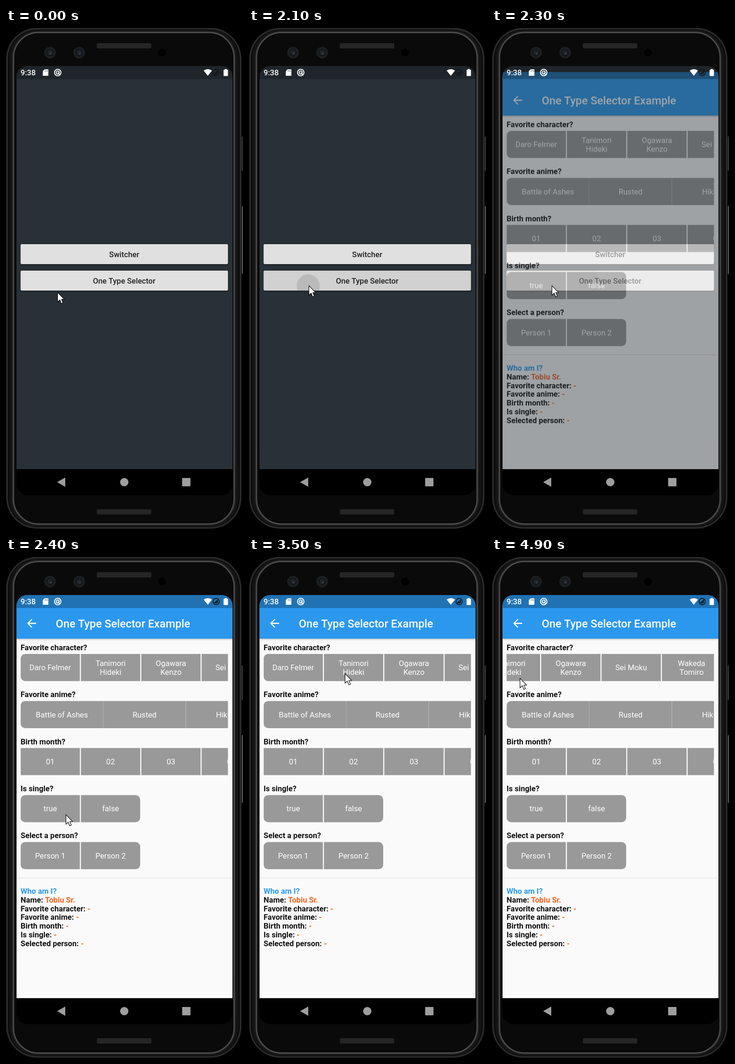
An HTML page with a canvas for the animation above (5 s loop, 512 px wide and 1080 px high).

```html
<!DOCTYPE html>
<html lang="en">
<head>
<meta charset="utf-8">
<title>One Type Selector</title>
<style>
html, body { margin: 0; width: 100%; height: 100%; overflow: hidden; background: #000; }
canvas { display: block; width: 512px; height: 1080px; }
</style>
</head>
<body>
<canvas id="stage" width="512" height="1080"></canvas>
<script>
const W = 512, H = 1080, LOOP = 5000, STEP = 100;
const SCREEN = { x: 22.5, y: 82, w: 467, h: 869 };
const DP = 467 / 392.73;
const ROW_TOP = 209, ROW_PITCH = 101.4, CELL_H = 58.5;
const LEFT = 31.5, RIGHT = 479.5;
const BLUE = '#2b98ee', ORANGE = '#f1641f', GREY = '#999';

const stage = document.getElementById('stage').getContext('2d');
const makeLayer = () => {
  const c = document.createElement('canvas');
  c.width = W;
  c.height = H;
  return c.getContext('2d');
};
const page = makeLayer();
const phone = makeLayer();

const clamp = v => Math.max(0, Math.min(1, v));

function bezier(x1, y1, x2, y2) {
  const at = (a, b, u) => 3 * a * u * (1 - u) ** 2 + 3 * b * u * u * (1 - u) + u ** 3;
  return x => {
    let lo = 0, hi = 1;
    for (let i = 0; i < 24; i++) {
      const mid = (lo + hi) / 2;
      if (at(x1, x2, mid) < x) lo = mid; else hi = mid;
    }
    return at(y1, y2, lo);
  };
}
const fastOutSlowIn = bezier(0.4, 0, 0.2, 1);
const easeIn = bezier(0.42, 0, 1, 1);
const smooth = u => u * u * (3 - 2 * u);

// Interpolates keys of [time, ...values], easing within each span.
function track(keys, t, ease = smooth) {
  let i = 0;
  while (i < keys.length - 2 && t >= keys[i + 1][0]) i++;
  const [a, b] = [keys[i], keys[i + 1]];
  const u = ease(clamp((t - a[0]) / (b[0] - a[0])));
  return a.slice(1).map((v, k) => v + (b[k + 1] - v) * u);
}

const POINTER = [[0, 111, 569.5], [1800, 129, 555], [2500, 129, 555], [3400, 207, 251], [3600, 207, 251], [4200, 138, 246], [4900, 60, 261]];
const SCROLL = [[3600, 0], [4200, 148.5], [4900, 186]];

function box(g, x, y, w, h, r, fill) {
  g.beginPath();
  g.roundRect(x, y, w, h, r);
  g.fillStyle = fill;
  g.fill();
}

function disc(g, x, y, r, fill) {
  g.beginPath();
  g.arc(x, y, r, 0, 7);
  g.fillStyle = fill;
  g.fill();
}

function poly(g, points, fill) {
  g.beginPath();
  points.forEach(([x, y]) => g.lineTo(x, y));
  g.closePath();
  g.fillStyle = fill;
  g.fill();
}

function text(g, str, x, y, { sp = 14, weight = 400, color = '#fff', align = 'left' } = {}) {
  g.font = `${weight} ${sp * DP}px Roboto, "Open Sans", sans-serif`;
  g.textAlign = align;
  g.fillStyle = color;
  g.fillText(str, x, y);
}

function drawSpeaker(g, y) {
  box(g, 196.5, y, 117, 11, 2, '#2b2b2b');
  for (let x = 199; x < 312; x += 3) {
    g.fillStyle = '#191919';
    g.fillRect(x, y + 1, 1, 9);
  }
}

function drawLens(g, x) {
  disc(g, x, 53, 12.5, '#1d2022');
  disc(g, x, 53, 8.5, '#15181b');
  disc(g, x, 53, 5, '#1f262b');
  disc(g, x + 1.5, 55, 2, '#3a4147');
}

// One ring of the metal edge, inset from the body's outline.
function rim(g, inset, color, width) {
  g.beginPath();
  g.roundRect(inset, inset * 0.6, 509 - 2 * inset, 1079 - 1.2 * inset, 67 - inset * 0.8);
  g.strokeStyle = color;
  g.lineWidth = width;
  g.stroke();
}

function drawPhone(g) {
  g.fillStyle = '#000';
  g.fillRect(0, 0, W, H);
  box(g, 509, 234, 4, 74, 1, '#303030');
  box(g, 509.5, 384, 4, 146, 1, '#555');
  box(g, 0, 0, 509, 1079, 67, '#0a0a0a');
  rim(g, 2, '#262626', 3);
  rim(g, 3, '#3a3a3a', 1);
  rim(g, 11, '#141414', 8);
  rim(g, 15.5, '#333', 4);
  rim(g, 16.5, '#626262', 1.2);
  drawSpeaker(g, 33);
  drawSpeaker(g, 1037.5);
  drawLens(g, 95);
  drawLens(g, 158);
  disc(g, 337, 53, 8.5, '#000');
  box(g, SCREEN.x, 900, SCREEN.w, 107, [0, 0, 24, 24], '#000');
  poly(g, [[110.5, 979], [128, 969], [128, 989]], '#9e9e9e');
  disc(g, 255.5, 979, 9, '#9e9e9e');
  box(g, 380.5, 970, 18, 18, 1, '#9e9e9e');
}

function shadowed(g, blur, dy, alpha, draw) {
  g.save();
  g.shadowColor = `rgba(0,0,0,${alpha})`;
  g.shadowBlur = blur;
  g.shadowOffsetY = dy;
  draw();
  g.restore();
}

function drawHome(g, t) {
  g.fillStyle = '#293138';
  g.fillRect(SCREEN.x, SCREEN.y, SCREEN.w, SCREEN.h);
  const press = clamp((t - 1950) / 100) * (1 - clamp((t - 2150) / 250));
  [['Switcher', 466], ['One Type Selector', 523]].forEach(([label, y], i) => {
    shadowed(g, 4, 1.5, 0.4, () => box(g, LEFT, y, 448, 43, 2.4, '#e0e0e0'));
    if (i && press) drawRipple(g, t, y, press);
    text(g, label, 255.3, y + 28, { weight: 500, color: '#212121', align: 'center' });
  });
}

function drawRipple(g, t, y, press) {
  g.save();
  box(g, LEFT, y, 448, 43, 2.4, `rgba(0,0,0,${0.065 * press})`);
  g.beginPath();
  g.rect(LEFT, y, 448, 43);
  g.clip();
  const [r] = track([[2000, 14], [2100, 25], [2400, 140]], t, u => u);
  disc(g, 128, 556, r, `rgba(0,0,0,${0.11 * press})`);
  g.restore();
}

const ROWS = [
  { label: 'Favorite character?', round: true, scroll: true,
    cells: ['Daro Felmer', 'Tanimori Hideki', 'Ogawara Kenzo', 'Sei Moku', 'Wakeda Tomiro'],
    split: [1, 2, 4] },
  { label: 'Favorite anime?', round: true, pitch: 178.6, gap: 0.25, cells: ['Battle of Ashes', 'Rusted', 'Hikuro'] },
  { label: 'Birth month?', cells: ['01', '02', '03', '04'] },
  { label: 'Is single?', round: true, closed: true, cells: ['true', 'false'] },
  { label: 'Select a person?', round: true, closed: true, cells: ['Person 1', 'Person 2'] }
];

function drawRow(g, row, i, shift) {
  const { pitch = 130.4, gap = 2.4, split = [], cells } = row;
  const top = ROW_TOP + i * ROW_PITCH;
  const mid = top + CELL_H / 2;
  text(g, row.label, LEFT, top - 8.2, { weight: 700, color: '#111' });
  g.save();
  g.beginPath();
  g.rect(LEFT, top - 1, RIGHT - LEFT, CELL_H + 2);
  g.clip();
  cells.forEach((name, k) => {
    const x = LEFT + k * pitch - (row.scroll ? shift : 0);
    const l = row.round && k === 0 ? 10 : 0;
    const r = row.closed && k === cells.length - 1 ? 10 : 0;
    box(g, x, top, pitch - gap, CELL_H, [l, r, r, l], GREY);
    const cx = x + (pitch - gap) / 2;
    const lines = split.includes(k) ? name.split(' ') : [name];
    lines.forEach((s, n) => {
      text(g, s, cx, mid + 6 + (n - (lines.length - 1) / 2) * 19, { align: 'center' });
    });
  });
  g.restore();
}

const SUMMARY = [['Name:', 'Tobiu Sr.'], ['Favorite character:', '-'], ['Favorite anime:', '-'], ['Birth month:', '-'], ['Is single:', '-'], ['Selected person:', '-']];

function drawSelector(g, shift) {
  g.clearRect(0, 0, W, H);
  g.fillStyle = '#fafafa';
  g.fillRect(SCREEN.x, SCREEN.y, SCREEN.w, SCREEN.h);
  shadowed(g, 4, 1, 0.35, () => {
    g.fillStyle = BLUE;
    g.fillRect(SCREEN.x, SCREEN.y, SCREEN.w, 94);
  });
  g.strokeStyle = '#fff';
  g.lineWidth = 2.3;
  g.beginPath();
  g.moveTo(65, 143);
  g.lineTo(47.5, 143);
  g.moveTo(56, 134.2);
  g.lineTo(47.3, 143);
  g.lineTo(56, 151.8);
  g.stroke();
  text(g, 'One Type Selector Example', 107.5, 152, { sp: 20, weight: 500 });

  ROWS.forEach((row, i) => drawRow(g, row, i, shift));
  g.fillStyle = '#e0e0e0';
  g.fillRect(SCREEN.x, 691, SCREEN.w, 1.2);

  const bold = { weight: 700, color: '#111' };
  text(g, 'Who am I?', LEFT, 726, { weight: 700, color: BLUE });
  SUMMARY.forEach(([key, value], i) => {
    const y = 744.8 + i * 18.83;
    text(g, key + ' ', LEFT, y, bold);
    text(g, value, LEFT + g.measureText(key + ' ').width, y, { weight: 700, color: ORANGE });
  });
}

function drawStatusBar(g) {
  g.fillStyle = 'rgba(0,0,0,.25)';
  g.fillRect(SCREEN.x, SCREEN.y, SCREEN.w, 28);
  text(g, '9:38', 31.5, 102, { weight: 500 });
  poly(g, [[83.5, 89], [91.5, 89], [91.5, 103], [79.5, 103], [79.5, 93]], '#fff');
  g.fillStyle = '#555';
  [84, 86.5, 89].forEach(x => g.fillRect(x, 91, 1, 3));
  g.strokeStyle = '#fff';
  g.lineWidth = 2;
  g.beginPath();
  g.arc(111.8, 96, 7, 0, 7);
  g.stroke();
  g.beginPath();
  g.arc(111.8, 96, 3.3, 0.8, 6.6);
  g.moveTo(112, 96);
  g.lineTo(116, 100.5);
  g.stroke();
  g.beginPath();
  g.moveTo(436, 103);
  g.lineTo(427, 91.8);
  g.quadraticCurveTo(436, 85.5, 445, 91.8);
  g.closePath();
  g.fillStyle = '#fff';
  g.fill();
  g.strokeStyle = '#10181c';
  g.lineWidth = 1.8;
  g.beginPath();
  g.arc(454, 96, 6.8, 0, 7);
  g.moveTo(450, 99.5);
  g.lineTo(458, 92.5);
  g.moveTo(454, 96);
  g.arc(454, 96, 3, 0, 3);
  g.stroke();
  box(g, 470, 90, 9.5, 13.5, 1, '#fff');
  g.fillStyle = '#fff';
  g.fillRect(472.5, 88.5, 4.5, 2);
}

function drawPointer(g, x, y) {
  g.save();
  g.translate(x + 0.5, y + 0.5);
  poly(g, [[0, 0], [0, 20.5], [4.8, 16], [8.2, 24], [11.6, 22.5], [8.3, 15], [14.3, 14.5]], '#fff');
  g.strokeStyle = '#000';
  g.lineWidth = 1.1;
  g.stroke();
  g.restore();
}

function draw(t) {
  const g = stage;
  g.globalAlpha = 1;
  g.drawImage(phone.canvas, 0, 0);
  g.save();
  g.beginPath();
  g.roundRect(SCREEN.x, SCREEN.y, SCREEN.w, SCREEN.h, [23, 23, 0, 0]);
  g.clip();
  const u = clamp((t - 2088) / 300);
  if (u < 1) drawHome(g, t);
  if (u > 0.1) {
    drawSelector(page, track(SCROLL, t, v => 1 - (1 - v) ** 2)[0]);
    g.globalAlpha = easeIn(u);
    g.drawImage(page.canvas, 0, (1 - fastOutSlowIn(u)) * SCREEN.h / 4);
    g.globalAlpha = 1;
  }
  drawStatusBar(g);
  g.restore();
  drawPointer(g, ...track(POINTER, t));
}

drawPhone(phone);
const start = performance.now();
function tick() {
  const t = (performance.now() - start) % LOOP;
  draw(Math.floor(t / STEP) * STEP);
  requestAnimationFrame(tick);
}
tick();
</script>
</body>
</html>
```
